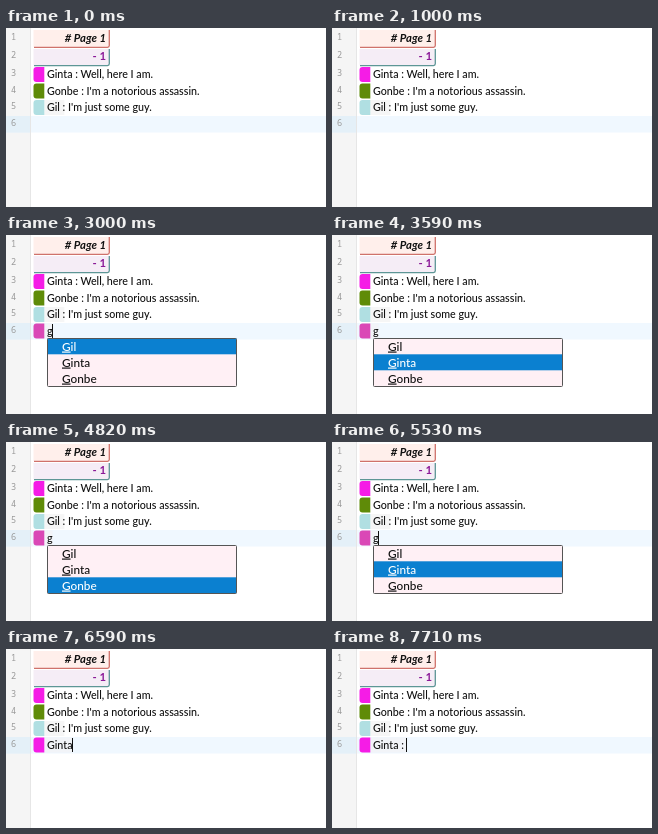
An HTML page that plays this animation: 320x179 px, repeating every 8 s.

```html
<!DOCTYPE html>
<html lang="en">
<head>
<meta charset="utf-8">
<title>Script editor completion</title>
<style>
html, body { margin: 0; height: 100%; overflow: hidden; background: #fff; }
svg { display: block; width: 100vw; height: 100vh; }
text { font: 500 10.7px Lato, "Open Sans", sans-serif; white-space: pre; fill: #111; }
.num { font: 8.6px "Noto Sans Mono", monospace; fill: #999; text-anchor: middle; }
.head { font-size: 11.3px; font-weight: bold; text-anchor: end; }
.page { font-style: italic; }
.item { font-size: 11.8px; }
</style>
</head>
<body>
<svg viewBox="0 0 320 179">
  <defs><path id="tab" d="M38.3 0V15H30.5Q27.5 15 27.5 12V3Q27.5 0 30.5 0Z"/></defs>
  <rect width="320" height="179" fill="#fff"/>
  <rect width="25" height="179" fill="#f5f5f5"/>
  <rect y="88" width="320" height="16.5" fill="#f0f8ff"/>
  <rect y="88" width="25" height="16.5" fill="#e4f0f8"/>
  <path d="M24.5 0V179" stroke="#e6e6e6"/>
  <g id="gutter"></g>

  <path d="M27.5 2H103V19H27.5Z" fill="#ffefeb"/>
  <path d="M28 19.3H101.5Q103.3 19.3 103.3 17.5V2" fill="none" stroke="#cf726b" stroke-width="1.3"/>
  <text class="head page" x="100" y="13.5"># Page 1</text>
  <path d="M27.5 21H103V37.5H27.5Z" fill="#f5edf6"/>
  <path d="M28 37.6H101.5Q103.3 37.6 103.3 35.8V21" fill="none" stroke="#5d9696" stroke-width="1.3"/>
  <text class="head" x="100" y="32" style="fill:#8b1a98">- 1</text>

  <rect x="38.3" y="72" width="20" height="15" fill="#f6f6f6"/>
  <g id="lines"></g>
  <rect id="shade" x="38.3" y="88.5" height="15" fill="#f2f4f8"/>
  <use id="swatch" href="#tab" y="88.4"/>
  <text id="typed" x="41" y="99.8"></text>
  <rect id="caret" y="89" width="1" height="14" fill="#111"/>

  <g id="popup">
    <rect x="41.5" y="103.5" width="189" height="48" rx="1" fill="#fff0f5"/>
    <rect id="bar" x="41.5" width="189" height="16" fill="#0b80d0"/>
    <rect x="41.5" y="103.5" width="189" height="48" rx="1" fill="none" stroke="#555"/>
    <g id="items"></g>
  </g>
</svg>
<script>
const $ = id => document.getElementById(id);
const names = ["Gil", "Ginta", "Gonbe"];
const pink = "#f51ce6";

const lines = [
  [pink, "Ginta : Well, here I am."],
  ["#5f8b08", "Gonbe : I'm a notorious assassin."],
  ["#b0dfe2", "Gil : I'm just some guy."]
];
$("lines").innerHTML = lines.map(([color, text], i) => {
  const y = 38.9 + i * 16.5;
  return `<use href="#tab" y="${y}" fill="${color}"/>
    <text x="41" y="${y + 11.3}">${text}</text>`;
}).join("");

$("gutter").innerHTML = [12, 30.4, 48.4, 64.9, 81.4, 97.9].map((y, i) =>
  `<text class="num" x="7.5" y="${y}">${i + 1}</text>`).join("");

$("items").innerHTML = names.map((name, i) =>
  `<text class="item" x="56" y="${115.5 + i * 16}"><tspan text-decoration="underline">${name[0]}</tspan>${name.slice(1)}</text>`).join("");

// Each track lists [start ms, value]; the latest started value holds.
const typed = [[0, ""], [1820, "g"], [6470, "Ginta"], [7240, "Ginta "], [7350, "Ginta :"], [7710, "Ginta : "]];
const picked = [[0, -1], [1820, 0], [3590, 1], [3880, 2], [5530, 1], [5760, 0], [6060, 1], [6470, -1]];
const blink = [470, 1000, 1650, 2410, 3000, 3590, 4180, 4820, 5410, 6000, 6590];
const at = (track, t) => track.findLast(step => step[0] <= t)[1];

function draw(t) {
  const text = at(typed, t), pick = at(picked, t);
  $("typed").textContent = text;
  const width = text ? $("typed").getComputedTextLength() : 0;

  $("swatch").setAttribute("fill", text.length > 1 ? pink : text ? "#da48b6" : "none");
  $("shade").setAttribute("width", text ? width + 2.7 : 0);
  $("caret").setAttribute("x", text ? Math.floor(41 + width) : 28);
  $("caret").style.display = blink.filter(b => b <= t).length % 2 ? "" : "none";

  $("popup").style.display = pick < 0 ? "none" : "";
  $("bar").setAttribute("y", 103.3 + Math.max(pick, 0) * 16);
  [...$("items").children].forEach((item, i) => item.style.fill = i === pick ? "#fff" : "#111");
}

function frame(now) {
  draw(now % 8000);
  requestAnimationFrame(frame);
}
draw(0);
requestAnimationFrame(frame);
</script>
</body>
</html>
```
